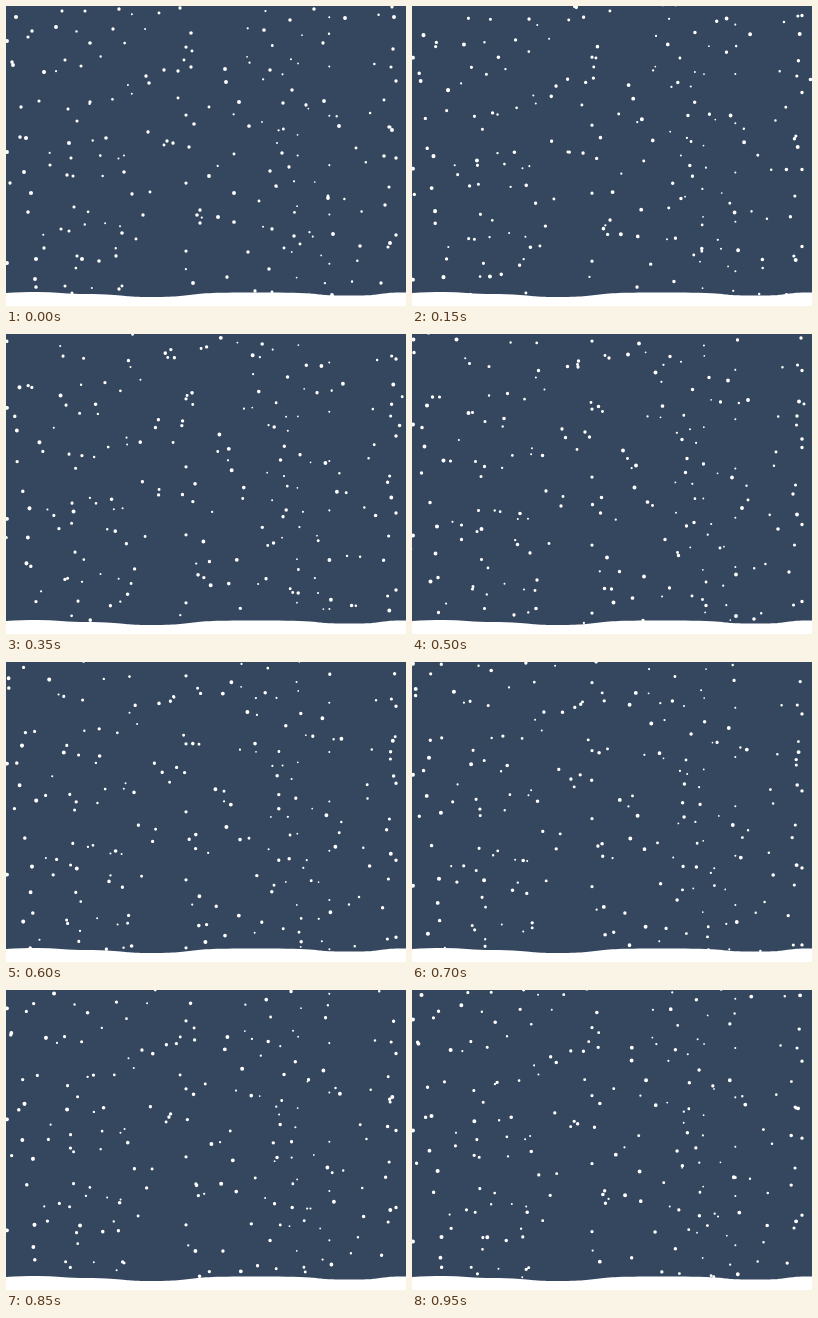
Animation of 400 by 300 pixels, one loop 1 s. Source, as an HTML page:

```html
<!DOCTYPE html>
<html lang="en">
<head>
<meta charset="utf-8">
<title>Snowfall</title>
<style>
html, body { margin: 0; width: 100%; height: 100%; overflow: hidden; background: #35475e; }
svg { display: block; width: 100%; height: 100%; }
</style>
</head>
<body>
<svg viewBox="0 0 400 300">
  <rect width="400" height="300" fill="#35475e"/>
  <path id="flakes" fill="#fff"/>
  <path fill="#fff" d="M0 287 C20 286 38 285.5 55 287 S88 287.5 108 289 S125 291 148 291 S180 289.5 192 288
    S230 286.5 250 286.5 S292 286.5 304 287.5 S318 289.5 340 289.5 S364 289.5 374 288 S390 286.5 400 286.5 V300 H0Z"/>
</svg>
<script>
const LOOP = 1000, STEP = 50, FLOOR = 292;

// Each strand: x, y of one flake at time 0, then its fall and drift per loop.
// Flakes follow each other one loop apart, so the loop closes seamlessly.
const strands = [
  [1, 35, 111, 0], [7, 59, 107, 11], [15, 101, 76, -11], [38, 66, 121, -13],
  [10, 11, 121, 10], [14, 131, 75, 8], [50, 21, 116, 13], [107, 23, 73, -23],
  [84, 37, 95, 16], [113, 3, 67, 27], [158, 64, 62, -16], [143, 77, 89, -25],
  [185, 61, 74, -24], [180, 41, 68, 0], [172, 65, 76, 11], [186, 45, 47, -14],
  [185, 27, 91, 3], [220, 76, 111, 8], [219, 63, 107, -16], [233, 96, 115, -21],
  [203, 101, 47, 25], [243, 120, 96, -15], [264, 64, 83, 12], [277, 97, 83, -7],
  [264, 165, 81, -22], [317, 37, 62, -17], [318, 95, 97, 4], [350, 142, 48, -28],
  [387, 43, 78, -4], [385, 61, 60, -1], [390, 75, 77, 0], [339, 12, 108, -6],
  [378, 150, 90, -24], [33, 95, 64, 11], [59, 54, 49, 3], [79, 5, 55, -4],
  [388, 11, 113, -2]
].map(([x, y, fall, drift]) => ({ x, y, fall, drift, r: 1.1 + fall / 130 }));

let seed = 29;
function rand(min, max) {
  seed = (seed * 16807) % 2147483647;
  return min + (max - min) * seed / 2147483647;
}

// Fine, slower snow, denser on the right.
for (let i = 0; i < 17; i++) {
  strands.push({
    x: i % 3 ? rand(240, 400) : rand(50, 240),
    y: rand(0, 80),
    fall: rand(48, 85),
    drift: rand(-16, 16),
    r: rand(0.8, 1.4)
  });
}

const flakes = document.getElementById("flakes");

function dot(x, y, r) {
  const d = (2 * r).toFixed(2), a = r.toFixed(2);
  return `M${(x - r).toFixed(2)} ${(y - r * 0).toFixed(2)}a${a} ${a} 0 1 0 ${d} 0a${a} ${a} 0 1 0 -${d} 0`;
}

function draw(ms) {
  const phase = Math.floor((ms % LOOP) / STEP) * STEP / LOOP;
  let path = "";
  for (const s of strands) {
    let n = Math.ceil((-4 - s.y) / s.fall - phase);
    for (;; n++) {
      const y = s.y + s.fall * (n + phase);
      if (y > FLOOR) break;
      path += dot(s.x + s.drift * (n + phase), y, s.r);
    }
  }
  flakes.setAttribute("d", path);
}

let start;
function tick(now) {
  start ??= now;
  draw(Math.max(0, now - start));
  requestAnimationFrame(tick);
}
draw(0);
requestAnimationFrame(tick);
</script>
</body>
</html>
```
